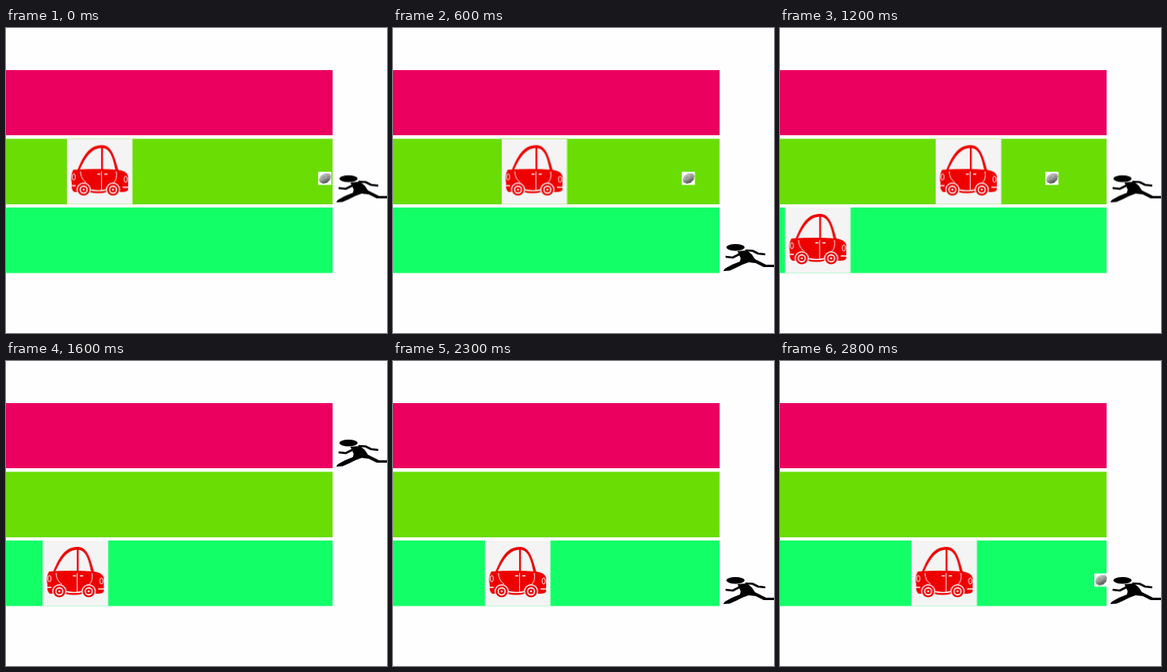
Recreate the animation shown at these times as an HTML page without scripts. Size 480x384 px, loop 2900 ms.

```html
<!DOCTYPE html>
<html lang="en">
<head>
<meta charset="utf-8">
<title>Three lanes</title>
<style>
  html, body { margin: 0; width: 100%; height: 100%; overflow: hidden; background: #fefdff; }
  svg { display: block; width: 480px; height: 384px; }

  /* The 1ms lead keeps steps clear of rounding at their boundaries. */
  .drive, .roll { animation: travel 2900ms steps(29) -1ms infinite; }
  .drive { --distance: 288.55px; }
  .roll { --distance: -142.7px; }
  .crash, .enter, .throw, .runner { animation: 2900ms step-end -1ms infinite; }
  .crash { animation-name: crash; }
  .enter { animation-name: enter; }
  .throw { animation-name: throw; }
  .runner { animation-name: switch-lane; }

  @keyframes travel { to { transform: translateX(var(--distance)); } }
  @keyframes crash { 0% { visibility: visible; } 55.172%, 100% { visibility: hidden; } }
  @keyframes enter { 0% { visibility: hidden; } 41.379%, 100% { visibility: visible; } }
  @keyframes throw { 0% { visibility: hidden; } 86.207%, 100% { visibility: visible; } }
  @keyframes switch-lane {
    0%, 34.483%, 68.966% { transform: translateY(185.5px); }
    17.241%, 79.31%, 100% { transform: translateY(272px); }
    48.276% { transform: translateY(99px); }
  }
</style>
</head>
<body>
<svg viewBox="0 0 480 384">
  <defs>
    <linearGradient id="stone" x1="0" y1="0" x2=".6" y2="1">
      <stop offset="0" stop-color="#d6d6d6"/>
      <stop offset=".55" stop-color="#a2a2a2"/>
      <stop offset="1" stop-color="#454545"/>
    </linearGradient>

    <g id="wheel">
      <circle r="9" fill="#f4f4f4"/>
      <circle r="7.6" fill="#ee0000"/>
      <circle r="5.2" fill="#f4f4f4"/>
      <circle r="3.6" fill="#ee0000"/>
      <circle r="1.3" fill="#f4f4f4"/>
    </g>

    <g id="car">
      <path fill="#f4f4f4" d="M0 0H82.5V82.5H0Z"/>
      <g fill="#ee0000">
        <path fill-rule="evenodd" d="M13 40C20 23 27 8 44 8C57 8 60 24 65 40Z M16 39H61C58 25 55 12 44 11.500C31 12 24 22 16 39Z"/>
        <path d="M43 10h2.300v30h-2.300Z"/>
        <path d="M8 39Q38 37 64 39Q75 40 77 47V64Q76 67 70 67H50Q40 70 28 67H9Q5 64 6 56Q4 46 8 39Z"/>
      </g>
      <g fill="none" stroke="#f4f4f4">
        <path d="M43.500 41V66M62 41Q64 51 58 56M17 41Q17 50 24 55"/>
        <path d="M28 64Q40 67 51 64" stroke-width="1.300"/>
        <ellipse cx="8.500" cy="48" rx="2" ry="4"/>
        <ellipse cx="74" cy="51" rx="2" ry="4"/>
        <path d="M5 59H11M70 61H77M38 44.500h4M47 44.500h4" stroke-width="1.400"/>
      </g>
      <use href="#wheel" x="21" y="64"/>
      <use href="#wheel" x="58" y="64"/>
    </g>

    <g id="rock">
      <path fill="#fff" d="M0 0H16.500V16.500H0Z"/>
      <path fill="url(#stone)" d="M1 10L3 5L8 2L14 2L16 5L15 10L11 14L6 15L2 13Z"/>
      <path fill="none" stroke="#777" stroke-width=".7" d="M5 8l3-2M8 11l4-3M4 12l2-1M11 5l2 1"/>
    </g>
  </defs>

  <path fill="#eb0060" d="M0 53H411.500V135H0Z"/>
  <path fill="#6add05" d="M0 139.500H411.500V222H0Z"/>
  <path fill="#13ff67" d="M0 226H411.500V308.500H0Z"/>

  <g class="crash">
    <use class="drive" href="#car" x="76.800" y="139.500"/>
    <use class="roll" href="#rock" x="393.300" y="181"/>
  </g>
  <g class="enter"><use class="drive" href="#car" x="-113" y="226"/></g>
  <g class="throw"><use class="roll" href="#rock" x="533.800" y="267.500"/></g>

  <g class="runner">
    <ellipse cx="431.500" cy="4.200" rx="11.500" ry="4.200"/>
    <path d="M434 9L446 8L452 13L456 19L464 23L470 26L480 26V29L467 29L457 24L448 23L440 26L432 30L424 33.500L416 34L418 31L427 26L437 22L438 18Z"/>
    <path fill="none" stroke="#000" stroke-width="2.600" stroke-linejoin="round" d="M440 11L428 17L419 16M444 8L453 8.500L460 12L469 13"/>
  </g>
</svg>
</body>
</html>
```
